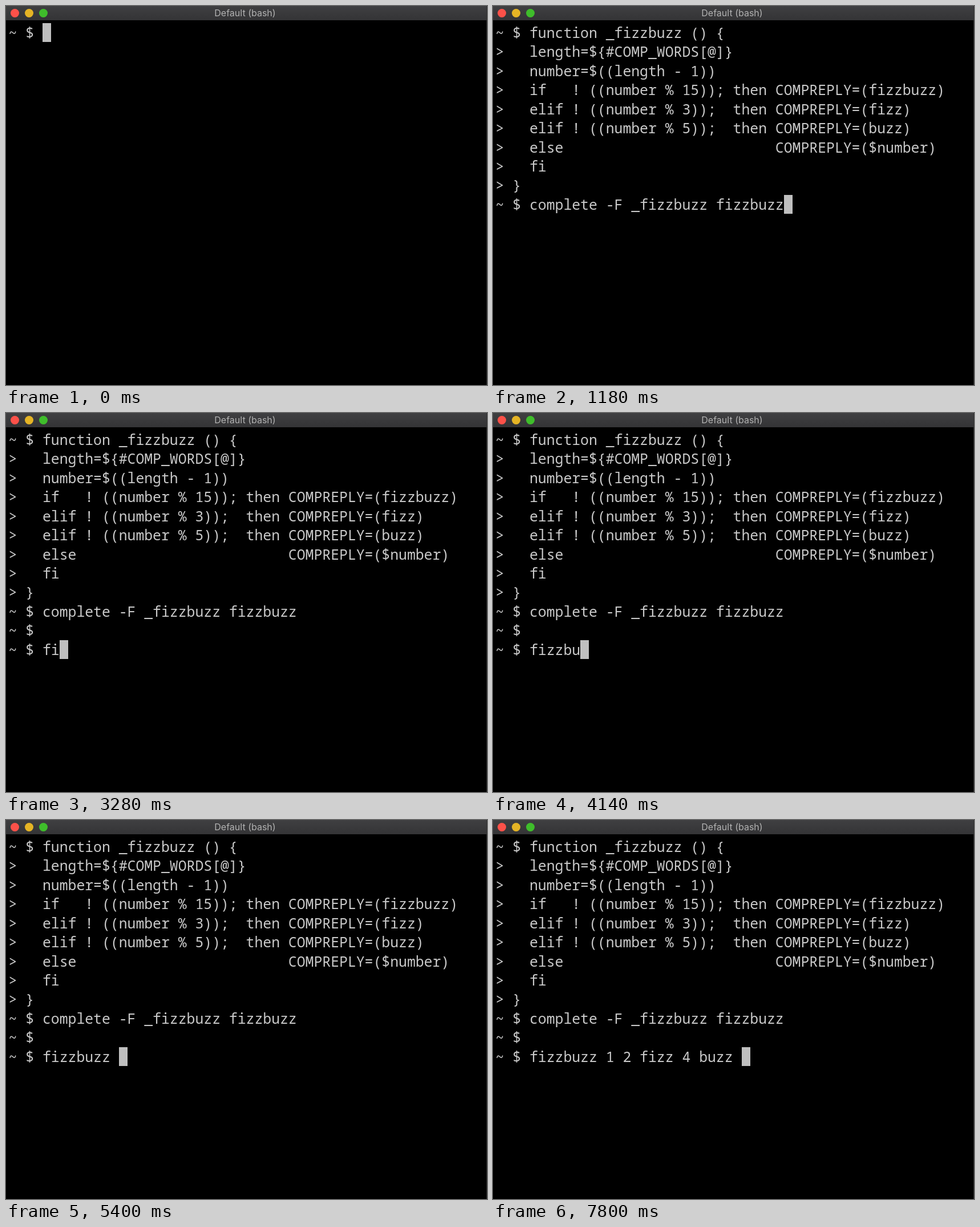
Animation of 843 by 664 pixels, one loop 8 s. Source, as an HTML page:

```html
<!DOCTYPE html>
<html lang="en">
<head>
<meta charset="utf-8">
<title>Terminal</title>
<style>
  html, body { margin: 0; width: 100%; height: 100%; overflow: hidden; background: #000; }
  #window { position: relative; width: 843px; height: 664px; overflow: hidden; background: #000; }
  #window::after { content: ""; position: absolute; top: 0; right: 0; width: 1px; height: 100%; background: #2c2c2c; }
  #bar { position: absolute; width: 843px; height: 25px; background: linear-gradient(#3f3f41, #343436); }
  #bar i { position: absolute; top: 5px; width: 15px; height: 15px; border-radius: 50%; }
  #title {
    position: absolute; left: 0; width: 838px; text-align: center; white-space: pre;
    font: 16px/25px Inter, Roboto, sans-serif; color: #b2b2b2;
  }
  #screen {
    position: absolute; left: 4.5px; top: 29.8px; margin: 0; color: #c9c9c9;
    font: 24.78px/33.45px "Noto Sans Mono", "DejaVu Sans Mono", monospace;
    font-variant-ligatures: none;
  }
  #cursor { position: absolute; width: 15px; height: 33px; background: #bfbfbf; }
</style>
</head>
<body>
<div id="window">
  <div id="bar">
    <i style="left:8px;background:#fc5149"></i>
    <i style="left:33px;background:#e5b425"></i>
    <i style="left:58px;background:#3fbd2b"></i>
    <div id="title">Default (bash)</div>
  </div>
  <pre id="screen"></pre>
  <div id="cursor"></div>
</div>
<script>
const LOOP = 8000, CELL_W = 14.867, CELL_H = 33.45, LEFT = 4.5, TOP = 29.8;
const PROMPT = "~ $ ";
const SCRIPT = `function _fizzbuzz () {
>   length=\${#COMP_WORDS[@]}
>   number=$((length - 1))
>   if   ! ((number % 15)); then COMPREPLY=(fizzbuzz)
>   elif ! ((number % 3));  then COMPREPLY=(fizz)
>   elif ! ((number % 5));  then COMPREPLY=(buzz)
>   else                         COMPREPLY=($number)
>   fi
> }
~ $ complete -F _fizzbuzz fizzbuzz`;

// [time in ms, text added to the screen]
const steps = [
  [0, PROMPT],
  [700, SCRIPT],
  [1460, "\n" + PROMPT],
  [2240, "\n" + PROMPT],
  [2960, "f"], [3160, "i"], [3400, "z"], [3560, "z"],
  [3880, "b"], [4080, "u"], [4320, "z"], [4480, "z"],
  [5200, " "],
  [5900, "1 "], [6340, "2 "], [6820, "fizz "], [7260, "4 "], [7660, "buzz "]
];

const screenEl = document.getElementById("screen");
const cursorEl = document.getElementById("cursor");
let shown = "";

function draw(t) {
  const text = steps.filter(([at]) => at <= t).map(([, added]) => added).join("");
  if (text === shown) return;
  shown = screenEl.textContent = text;
  const lines = text.split("\n");
  cursorEl.style.left = Math.round(LEFT + lines.at(-1).length * CELL_W) + "px";
  cursorEl.style.top = Math.round(TOP + (lines.length - 1) * CELL_H) + "px";
}

const start = performance.now();
function tick() {
  draw((performance.now() - start) % LOOP);
  requestAnimationFrame(tick);
}
tick();
</script>
</body>
</html>
```
